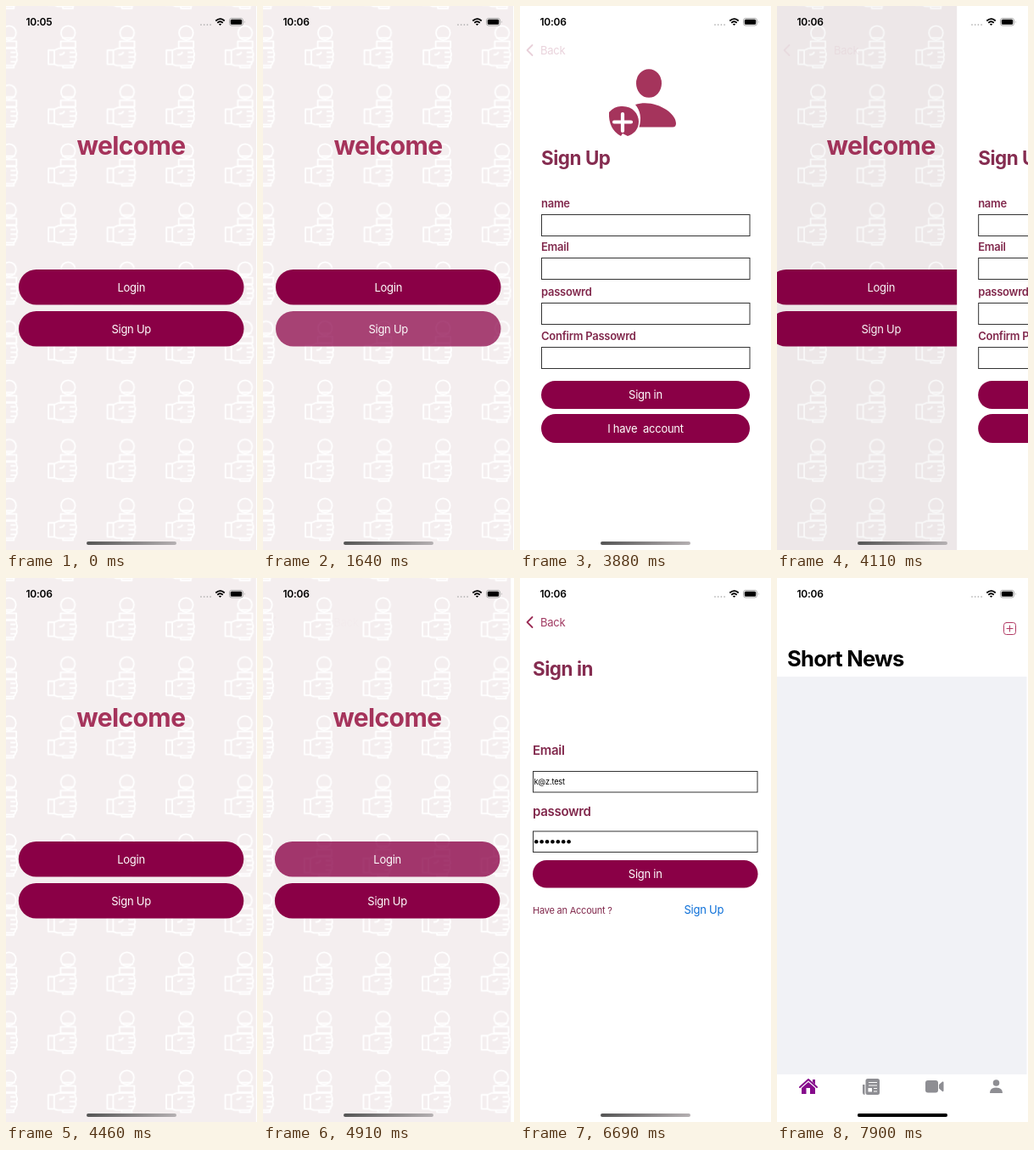
An HTML page that plays this animation: 296 by 640 pixels, repeating every 8000 ms.

```html
<!DOCTYPE html>
<html lang="en">
<head>
<meta charset="utf-8">
<title>News app sign-in</title>
<style>
  html, body { margin: 0; width: 100%; height: 100%; overflow: hidden; background: #fff; }
  svg { display: block; width: 296px; height: 640px; }
  text { font: 13px Inter, "Liberation Sans", sans-serif; letter-spacing: -.02em; }
  .mid { text-anchor: middle; fill: #fff; }
  .label { font-weight: 600; fill: #81284c; }
  .big { font-size: 15px; }
  .title { font-size: 22.4px; font-weight: 700; fill: #852c50; }
  .pill { fill: #8a0046; }
  .field { fill: #fff; stroke: #333; }
  .line { fill: none; stroke: #9b2c55; stroke-linecap: round; stroke-linejoin: round; }
  .tab { fill: #8e8e93; }
</style>
</head>
<body>
<svg viewBox="0 0 296 640">
  <defs>
    <pattern id="mics" x="47" y="21" width="69.6" height="69.5" patternUnits="userSpaceOnUse">
      <g fill="none" stroke="#fff" stroke-width="1.8" stroke-linejoin="round">
        <circle cx="26.2" cy="10.6" r="8.3"/>
        <path d="M19 16.5H33.5M17.5 20.5H35V28H17.5Z"/>
        <path d="M3 31H10L15 29H32Q35.5 29 35 33Q37 36 35 39Q36.5 43 34 45.5Q34 49 30 49H14L10 47.5H3Z"/>
        <path d="M10 31V47.5M16 36Q20 37 22 33M28 33.5H34M28 39H35M28 44.5H34M20 49V51.5H32V49"/>
      </g>
    </pattern>
    <linearGradient id="grey">
      <stop stop-color="#555"/><stop offset="1" stop-color="#b5b0b2"/>
    </linearGradient>
  </defs>

  <g id="welcome">
    <rect width="295" height="640" fill="#f4eeef"/>
    <rect width="295" height="640" fill="url(#mics)"/>
    <text x="147.5" y="175" class="mid" style="font-size:30px;font-weight:700;fill:#a5335b">welcome</text>
    <g id="login"></g>
    <g id="signup"></g>
    <rect id="dim" width="296" height="640"/>
  </g>

  <g id="register">
    <rect width="296" height="640" fill="#fff"/>
    <g fill="#a5345c">
      <ellipse cx="152" cy="91" rx="15" ry="16.8"/>
      <path d="M136 116C158 109 184 125 184 138Q184 142.500 180 142.500H140.500Q145 127 136 116Z"/>
      <path d="M105 125Q112 117 121 118C133 118 140 127 140 136C140 145 134 151 127 153L121 150L119 153Q104 145 105 125Z"/>
    </g>
    <path d="M111 136.500H131M121 127V147" stroke="#fff" stroke-width="4.200" stroke-linecap="round"/>
    <text x="25" y="186.500" class="title">Sign Up</text>
  </g>

  <g id="signin">
    <rect width="296" height="640" fill="#fff"/>
    <text x="15" y="115" class="title">Sign in</text>
    <text x="15" y="208" class="label big">Email</text>
    <text x="15" y="280" class="label big">passowrd</text>
    <rect x="15.500" y="227.500" width="264.500" height="24.500" class="field"/>
    <rect x="15.500" y="298" width="264.500" height="24.500" class="field"/>
    <text x="16.500" y="243" style="font-size:9.2px">k@z.test</text>
    <g id="dots"></g>
    <g id="enter"></g>
    <text x="15" y="394.500" style="font-size:11px;fill:#81284c">Have an Account ?</text>
    <text x="193.500" y="395" style="fill:#0a6ed8">Sign Up</text>
  </g>

  <g id="back">
    <path d="M14.500 46L8.500 52L14.500 58" class="line" stroke-width="1.800"/>
    <text id="backText" x="24" y="57" fill="#a03a62">Back</text>
  </g>

  <g id="home">
    <rect width="296" height="640" fill="#fff"/>
    <rect y="116" width="294.500" height="468" fill="#f1f2f6"/>
    <text x="12" y="103.500" style="font-size:25.6px;font-weight:700;letter-spacing:-.03em">Short News</text>
    <rect x="267.500" y="52.500" width="14" height="14" rx="3" class="line" style="stroke:#b23a64"/>
    <path d="M271 59.500H278M274.500 56V63" class="line" style="stroke:#b23a64"/>
    <g fill="#860b8c">
      <path d="M27 599L37 590L47 599" fill="none" stroke="#860b8c" stroke-width="2" stroke-linecap="round" stroke-linejoin="round"/>
      <path d="M29 600L37 593L45 600V607H29ZM42 590H45V596L42 593Z"/>
      <path d="M34.500 607V600H39V607Z" fill="#fff"/>
    </g>
    <g class="tab">
      <rect x="104.500" y="589" width="16.500" height="19" rx="2.500"/>
      <path d="M101 596H103.500V608Q101 608 101 605Z"/>
      <path d="M108 593.500H118M108 597H118M114 600.500H118M114 604H118" stroke="#fff" stroke-width="1.200"/>
      <rect x="107.500" y="600" width="4.500" height="4.500" fill="#fff"/>
      <rect x="175" y="591" width="15" height="14.500" rx="3"/>
      <path d="M191 596L195 592.500Q196.500 592 196.500 593.500V603Q196.500 604.500 195 604L191 600.500Z"/>
      <circle cx="258.500" cy="594" r="3.800"/>
      <path d="M251 606Q251 599.500 258.500 599.500T266 606Z"/>
    </g>
  </g>

  <text id="clock" x="23.500" y="23" style="font-size:12px;font-weight:600"></text>
  <path d="M230 22H242" stroke="#aaa" stroke-width="1.700" stroke-linecap="round" stroke-dasharray="0 3.700"/>
  <g fill="none" stroke="#000" stroke-width="1.800">
    <path d="M247.300 17.500Q252.500 12.700 257.700 17.500M249.300 19.800Q252.500 16.800 255.700 19.800"/>
    <path d="M252.500 23L250.800 21.300Q252.500 20 254.200 21.300Z" fill="#000" stroke="none"/>
  </g>
  <rect x="263.500" y="14.500" width="16" height="8.500" rx="2.500" fill="none" stroke="#aaa"/>
  <rect x="264.800" y="15.800" width="13.400" height="5.900" rx="1.500"/>
  <path d="M281 17.200Q282.500 18.700 281 20.200Z" fill="#aaa"/>
  <rect x="95" y="630" width="106" height="4" rx="2" fill="url(#grey)"/>
  <rect id="bar" x="95" y="630" width="106" height="4" rx="2"/>
</svg>
<script>
const $ = id => document.getElementById(id);
const add = (id, markup) => $(id).insertAdjacentHTML('beforeend', markup);

const pill = (id, x, y, w, h, label) => add(id,
  `<rect class="pill" x="${x}" y="${y}" width="${w}" height="${h}" rx="${h / 2}"/>
   <text class="mid" x="${x + w / 2}" y="${y + h / 2 + 4.8}">${label}</text>`);

pill('login', 15, 310, 265.5, 41.5, 'Login');
pill('signup', 15, 359, 265.5, 41.5, 'Sign Up');
pill('enter', 15, 332, 265.5, 32.5, 'Sign in');
pill('register', 25, 441, 246, 33, 'Sign in');
pill('register', 25, 480, 246, 34, 'I have\u00a0 account');

[['name', 245], ['Email', 296], ['passowrd', 349], ['Confirm Passowrd', 401]].forEach(([name, y]) =>
  add('register', `<text class="label" x="25" y="${y - 8}">${name}</text>
    <rect class="field" x="25.500" y="${y + .5}" width="245.500" height="25"/>`));
for (let i = 0; i < 7; i++) add('dots', `<circle cx="${19.2 + i * 6.4}" cy="310.300" r="2.300"/>`);

// The screen refreshes only at these moments.
const ticks = [0, 260, 1640, 1770, 1880, 1990, 2100, 2210,
  3880, 3990, 4110, 4230, 4340, 4460, 4690, 4800, 4920, 5030, 5150, 5260,
  6340, 6460, 6570, 6690, 6830, 6930, 7030, 7130, 7240, 7340, 7440, 7540, 7660];

const clamp = v => Math.max(0, Math.min(1, v));
// Critically damped spring: the share of the way still to go.
const rest = ms => {
  const s = Math.max(0, ms) * .0168;
  return (1 + s) * Math.exp(-s);
};
const press = (t, start) => t < start ? 1 : .72 + .28 * clamp((t - start - 60) / 290);
const show = (id, on) => $(id).style.display = on ? '' : 'none';
const fade = (id, v) => $(id).setAttribute('opacity', v);
const slide = (id, x) => $(id).setAttribute('transform', `translate(${x})`);

function draw() {
  const now = performance.now() % 8000;
  const t = ticks.findLast(v => v <= now);
  const popping = t >= 3880 && t < 4690;
  const pushed = t < 3880 ? 1 - rest(t - 1740)
    : popping ? rest(t - 3960)
    : t < 6340 ? 1 - rest(t - 4790) : 1;

  slide('welcome', -88 * pushed);
  fade('dim', .1 * pushed);
  for (const [id, on] of [['register', t < 4690], ['signin', t >= 4690]]) {
    show(id, on);
    slide(id, 296 * (1 - pushed));
  }
  fade('signup', press(t, 1640));
  fade('login', press(t, 4690));
  fade('enter', press(t, 6340));
  fade('back', popping ? .22 * pushed : pushed);
  $('backText').setAttribute('x', 24 + 60 * (1 - pushed));
  show('home', t >= 7660);
  fade('bar', clamp((t - 6830) / 710));
  $('clock').textContent = t < 260 ? '10:05' : '10:06';
  requestAnimationFrame(draw);
}
draw();
</script>
</body>
</html>
```
